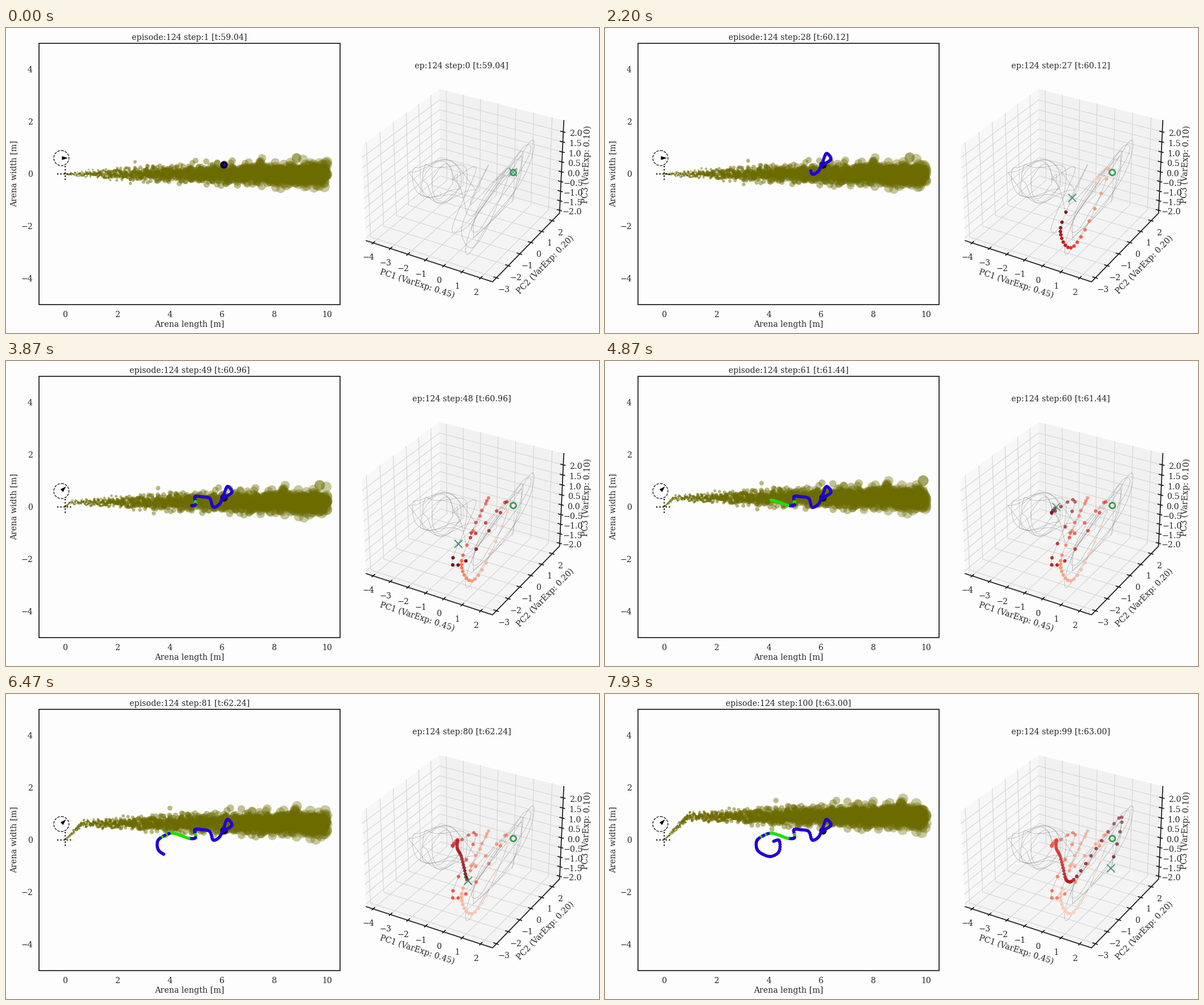
A matplotlib script for the animation above (8000 ms loop, 1042 px wide and 537 px high).

```python
import numpy as np
import matplotlib.pyplot as plt
from matplotlib.animation import FuncAnimation
from matplotlib.patches import Circle, Polygon, Rectangle

W, H, DPI = 1042, 537, 100
PT = 72 / DPI                      # points per pixel
STEPS, LOOP = 100, 8000
INK, AXIS = "0.15", "0.1"
plt.rcParams.update({"font.family": "DejaVu Serif", "font.size": 10.2,
                     "text.color": INK})

# Arena: pixels per metre and the pixel of the odour source
M, SRC = 46, np.array([104, 257])
WIND, TURN = 0.92, 36              # pixels per step, step of the wind shift

# Agent position every five steps
TRAIL = [(383, 241), (397, 231), (389, 221), (382, 237), (375, 252),
         (364, 257), (358, 242), (344, 239), (332, 239), (333, 253),
         (321, 254), (307, 249), (292, 245), (279, 249), (267, 258),
         (267, 273), (277, 282), (292, 286), (306, 277), (306, 258),
         (294, 260)]

# Turning points of the network state, by step
STATE = {0: (891, 254), 4: (861, 268), 8: (886, 250), 12: (851, 340),
         16: (824, 384), 22: (801, 364), 25: (803, 342), 30: (848, 241),
         35: (816, 311), 40: (880, 248), 44: (808, 352), 46: (785, 359),
         51: (826, 248), 56: (785, 268), 60: (793, 257), 66: (793, 272),
         71: (800, 286), 75: (805, 306), 80: (812, 329), 85: (829, 321),
         89: (863, 272), 94: (908, 217), 99: (889, 307)}


def spline(k, p, at):
    """Smooth curve through the points p at parameters k."""
    k, p = np.array(k), np.array(p, float)
    m = np.gradient(p, k, axis=0)
    i = np.clip(np.searchsorted(k, at, "right") - 1, 0, len(k) - 2)
    h = (k[i + 1] - k[i])[:, None]
    u = (at - k[i])[:, None] / h
    return ((1 + 2 * u) * (1 - u)**2 * p[i] + u * (1 - u)**2 * h * m[i]
            + u**2 * (3 - 2 * u) * p[i + 1] + u**2 * (u - 1) * h * m[i + 1])


def orbit(center, jitter, long, short, tilt):
    """Wobbly ellipse with random size around a center."""
    t = np.linspace(0, 2 * np.pi, 150)
    cx, cy = rng.normal(center, jitter)
    a, b = rng.uniform(*long), rng.uniform(*short)
    w1, w2 = rng.uniform(0, 2 * np.pi, 2)
    u = a * np.cos(t) * (1 + 0.12 * np.sin(2 * t + w1))
    v = b * (np.sin(t) + 0.3 * np.sin(3 * t + w2))
    c, s = np.cos(np.radians(tilt)), np.sin(np.radians(tilt))
    return np.column_stack([cx + u * c + v * s, cy - u * s + v * c])


def project(*p):
    """Unit-cube point to pixels: azimuth -60, elevation 30, distance 10."""
    x, y, z = (np.array(p) - 0.5) * (1.1905, 1.1905, 0.8929)
    c, s = np.cos(np.pi / 6), 0.5
    depth = 10 - (x * c * s - y * c * c + z * s)
    right, up = x * c + y * s, -x * s * s + y * c * s + z * c
    return np.array([806 + 2135 * right / depth, 269 - 2135 * up / depth])


def drift(step):
    """Distance carried by the wind up to a step, in pixels."""
    late = np.maximum(step - TURN, 0) * WIND * np.sqrt(0.5)
    return np.stack([np.minimum(step, TURN) * WIND + late, -late], axis=-1)


def label(x, y, s, rot=0, ha="center"):
    va = "center" if rot else "center_baseline"
    return ax.text(x, y, s, rotation=rot, ha=ha, va=va)


def line(pts, color=AXIS, width=1.7, **kw):
    return ax.plot(*np.transpose(pts), color=color, lw=width * PT, **kw)


def dots(diameter, **kw):
    return ax.scatter([], [], s=(diameter * PT)**2, linewidths=0, **kw)


def minus(s):
    return s.replace("-", "\u2212")


def fade(y):
    """Opacity standing in for depth."""
    return np.clip(0.55 + (y - 220) / 160 * 0.45, 0.55, 1)


fig = plt.figure(figsize=(W / DPI, H / DPI), dpi=DPI, facecolor="#fdfdfd")
ax = fig.add_axes([0, 0, 1, 1])
ax.set(xlim=(0, W), ylim=(H, 0))
ax.axis("off")
rng = np.random.default_rng(4)

# Arena frame and labels
for v in range(0, 11, 2):
    label(SRC[0] + M * v, 503.5, str(v))
for v in range(-4, 5, 2):
    label(47, SRC[1] - M * v, minus(str(v)), ha="right")
label(322.5, 520.5, "Arena length [m]")
label(14.5, 256.5, "Arena width [m]", 90)
arena_title = label(322.5, 15, "")

# Plume puffs, a few emitted per step
births = np.arange(-500, STEPS, 1 / 3)
side, along = rng.normal(size=(2, births.size))
plume = ax.scatter([], [], linewidths=0, zorder=2)

# Source cross and wind dial
for d in ((13.8, 0), (0, 13.8)):
    line([SRC - d, SRC + d], "k", 2.1, ls=":", zorder=3)
DIAL = np.array([97.3, 229])
ax.add_patch(Circle(DIAL, 13.3, fill=False, ec="k", lw=1.2 * PT, ls="--",
                    zorder=3))
needle = ax.add_patch(Polygon([DIAL] * 3, fc="k", lw=0, zorder=3))

ax.add_patch(Circle(TRAIL[0], 6.5, fc="k", lw=0, zorder=4))
trail = dots(5.8, zorder=5)
ax.add_patch(Rectangle((58, 27), 529, 10 * M, fill=False, ec=AXIS,
                       lw=1.7 * PT, zorder=6))

# PC plot: panes, grid, axes
for pane, shade in (([(0, 0, 0), (0, 1, 0), (0, 1, 1), (0, 0, 1)], 0.95),
                    ([(0, 1, 0), (1, 1, 0), (1, 1, 1), (0, 1, 1)], 0.90),
                    ([(0, 0, 0), (1, 0, 0), (1, 1, 0), (0, 1, 0)], 0.925)):
    ax.add_patch(Polygon([project(*p) for p in pane], fc=str(shade),
                         alpha=0.5, lw=0, zorder=1))

# ticks, limits, format, grid line, tick mark, label offset
AXES = [
    (np.arange(-4, 3), (-4.40, 2.63), "%d",
     lambda t: [(t, 0, 0), (t, 1, 0), (t, 1, 1)],
     lambda t: [(t, -0.014, 0), (t, 0.02, 0)], (-9, 24.5)),
    (np.arange(-3, 3), (-3.328, 2.718), "%d",
     lambda t: [(1, t, 0), (0, t, 0), (0, t, 1)],
     lambda t: [(1.014, t, 0), (0.98, t, 0)], (14, 20)),
    (np.arange(-2, 2.5, 0.5), (-2.15, 2.556), "%.1f",
     lambda t: [(0, 0, t), (0, 1, t), (1, 1, t)],
     lambda t: [(1.014, 1, t), (0.98, 1, t)], (22.5, 2)),
]
for ticks, (lo, hi), fmt, grid, mark, shift in AXES:
    for v in ticks:
        t = (v - lo) / (hi - lo)
        line([project(*p) for p in grid(t)], "0.83", 1.1, zorder=1.5)
        ends = [project(*p) for p in mark(t)]
        line(ends, zorder=3)
        x, y = np.mean(ends, axis=0) + shift
        label(x, y, minus(fmt % v))
line([project(*p) for p in ((0, 0, 0), (1, 0, 0), (1, 1, 0), (1, 1, 1))],
     zorder=3)
label(722, 450.5, "PC1 (VarExp: 0.45)", -18)
label(947.5, 416.5, "PC2 (VarExp: 0.20)", 45.7)
label(1020.5, 240.5, "PC3 (VarExp: 0.10)", 87.9)
state_title = label(800.5, 65, "")

# Trajectories
steps = np.arange(STEPS)
agent = spline(range(0, STEPS + 1, 5), TRAIL, steps)
keys, turns = list(STATE), list(STATE.values())
state = spline(keys, turns, steps)
scented = (abs(steps - 55.5) < 6) | np.isin(steps, (43, 44, 64, 67))
hue = np.where(scented[:, None], (0.12, 0.88, 0), (0.12, 0, 0.84))

thin = dict(color="0.45", width=0.8, alpha=0.45, zorder=2)
line(spline(keys, turns, np.linspace(0, STEPS - 1, 600)), **thin)
for _ in range(5):
    line(orbit((770, 268), 6, (20, 58), (18, 42), -15), **thin)
for _ in range(3):
    line(orbit((864, 294), 7, (85, 105), (8, 16), 58), **thin)

reds = plt.get_cmap("Reds")
past = dots(6.2, zorder=4)
ax.plot(*STATE[0], "o", ms=10 * PT, mfc="none", mec="#3aa05c", mew=3 * PT,
        zorder=5)
cross, = ax.plot([], [], "x", ms=14 * PT, mec="#2f8a62", mew=2.1 * PT,
                 zorder=6)


def draw(k):
    step, clock = k + 1, 59.04 + 0.04 * k
    arena_title.set_text(f"episode:124 step:{step} [t:{clock:.2f}]")
    state_title.set_text(f"ep:124 step:{k} [t:{clock:.2f}]")

    age = (step - births) * WIND / M
    pos = SRC + drift(step) - drift(births)
    spread = 3.2 * np.sqrt(np.maximum(age, 0))
    live = (age > 0) & (pos[:, 0] < SRC[0] + 10 * M)
    pos += spread[:, None] * np.column_stack([0.3 * along, side])
    pos[:, 0] = np.minimum(pos[:, 0], SRC[0] + 10 * M)
    age, pos = age[live], pos[live]
    rgba = np.tile([0.42, 0.42, 0, 1], (len(age), 1))
    rgba[:, 3] = np.clip(0.55 - 0.02 * age, 0.36, 1)
    plume.set_offsets(pos)
    plume.set_sizes(((0.7 + 0.87 * age) * 2 * PT)**2)
    plume.set_facecolor(rgba)

    a = np.pi / 4 if step >= TURN else 0
    turn = np.array([[np.cos(a), -np.sin(a)], [np.sin(a), np.cos(a)]])
    needle.set_xy(DIAL + np.array([(1, -3.3), (11.5, 0), (1, 3.3)]) @ turn)

    trail.set_offsets(agent[:step])
    trail.set_facecolor(hue[:step])

    tint = reds(np.arange(k) / max(k - 1, 1))
    tint[:, 3] = fade(state[:k, 1])
    past.set_offsets(state[:k])
    past.set_facecolor(tint)
    cross.set_data(*state[k][:, None])
    cross.set_alpha(float(fade(state[k, 1])))


anim = FuncAnimation(fig, draw, frames=STEPS, interval=LOOP // STEPS,
                     repeat=True, repeat_delay=0)
plt.show()
```
